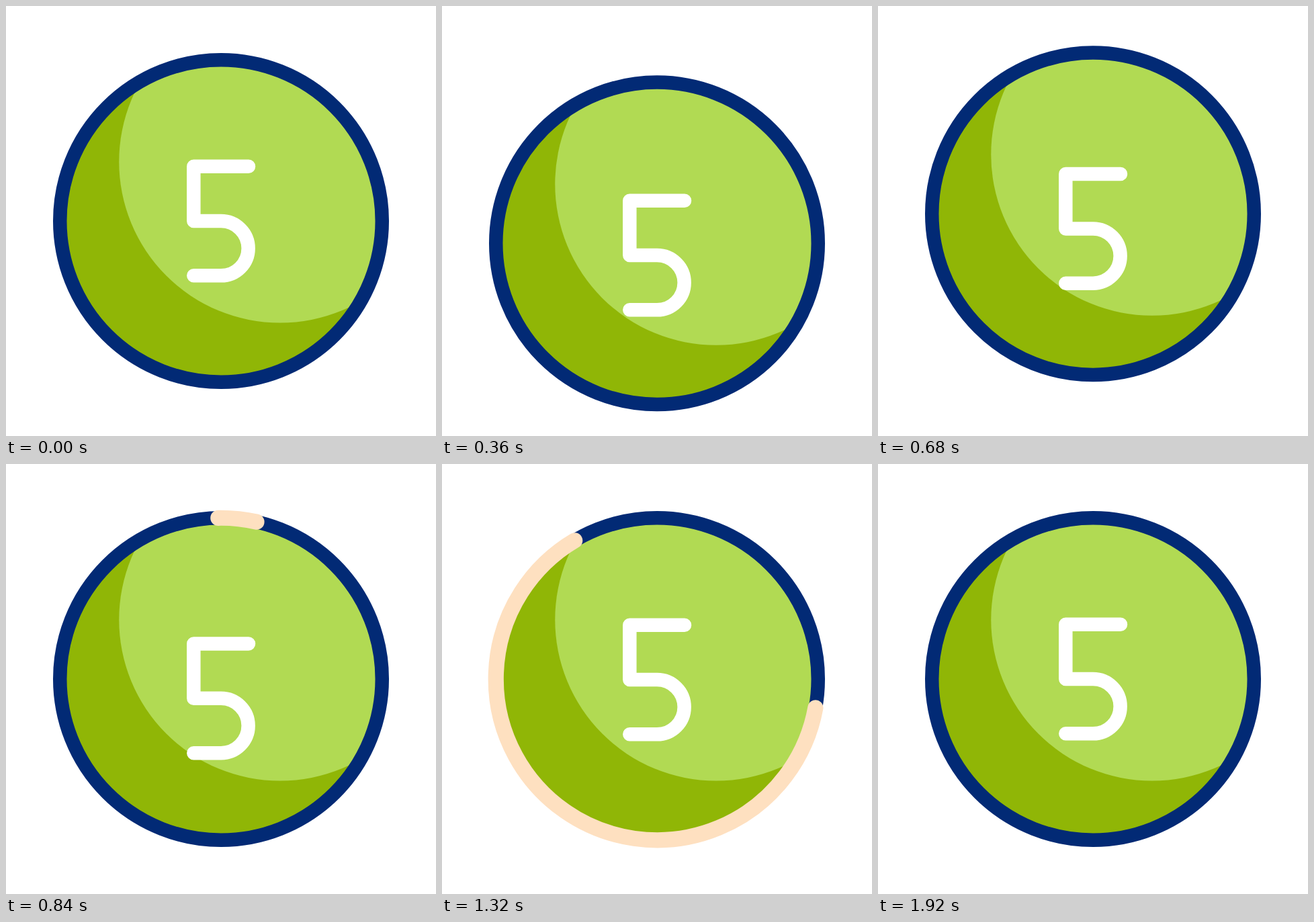
Recreate the animation shown at these times as an HTML page. Size 640x640 px, loop 2000 ms.

```html
<!DOCTYPE html>
<html lang="en">
<head>
<meta charset="utf-8">
<title>Rolling number ball</title>
<style>
  html, body { margin: 0; width: 100%; height: 100%; overflow: hidden; background: #fff; }
  svg { display: block; width: 100vw; height: 100vh; }
  .line { fill: none; stroke-width: 20.5; stroke-linecap: round; stroke-linejoin: round; }
</style>
</head>
<body>
<svg viewBox="0 0 640 640">
  <defs>
    <clipPath id="inside"><circle cx="320" cy="320" r="235"/></clipPath>
    <path id="five" class="line" stroke="#fff" d="M361 238.7H279.3V320H320a40.65 40.65 0 0 1 0 81.3H279.3"/>
  </defs>
  <g id="ball">
    <g clip-path="url(#inside)">
      <circle cx="320" cy="320" r="238" fill="#90b606"/>
      <circle cx="408" cy="231.8" r="239.75" fill="#b1da53"/>
      <g id="digit">
        <use href="#five"/>
        <use href="#five" y="462"/>
      </g>
    </g>
    <circle class="line" cx="320" cy="320" r="239.75" stroke="#022a75"/>
  </g>
  <path id="arc" class="line" stroke="#fee0c0" style="stroke-width:23.2"/>
</svg>
<script>
const LOOP = 2000, STEP = 40, ROLL = 462;
const get = id => document.getElementById(id);
const ball = get('ball'), digit = get('digit'), arc = get('arc');

// keys: [time, value] pairs, eased in and out between neighbours
const ballKeys = [[120, 0], [360, 33.3], [563, -31.8], [755, 0]];
const digitKeys = [[120, 0], [360, 51], [562, -64], [762, 55], [1335, -ROLL]];
const headKeys = [[760, -1], [1440, 359]];
const tailKeys = [[1000, -1], [1915, 359]];

function ease(t, t0, t1) {
  const u = Math.min(1, Math.max(0, (t - t0) / (t1 - t0)));
  return u * u * (3 - 2 * u);
}

function at(keys, t) {
  let value = keys[0][1];
  for (let i = 1; i < keys.length; i++)
    value += (keys[i][1] - keys[i - 1][1]) * ease(t, keys[i - 1][0], keys[i][0]);
  return value;
}

function point(deg) {
  const a = deg * Math.PI / 180;
  return (320 + 239.75 * Math.sin(a)) + ' ' + (320 - 239.75 * Math.cos(a));
}

function draw(t) {
  const y = at(ballKeys, t);
  ball.setAttribute('transform', `translate(0 ${y})`);
  digit.setAttribute('transform', `translate(0 ${at(digitKeys, t) - y})`);
  const tail = at(tailKeys, t), head = at(headKeys, t);
  arc.setAttribute('d', head - tail < 0.01 ? '' :
    `M${point(tail)}A239.75 239.75 0 ${head - tail > 180 ? 1 : 0} 1 ${point(head)}`);
}

function tick() {
  draw(Math.floor(performance.now() % LOOP / STEP) * STEP);
  requestAnimationFrame(tick);
}
tick();
</script>
</body>
</html>
```
